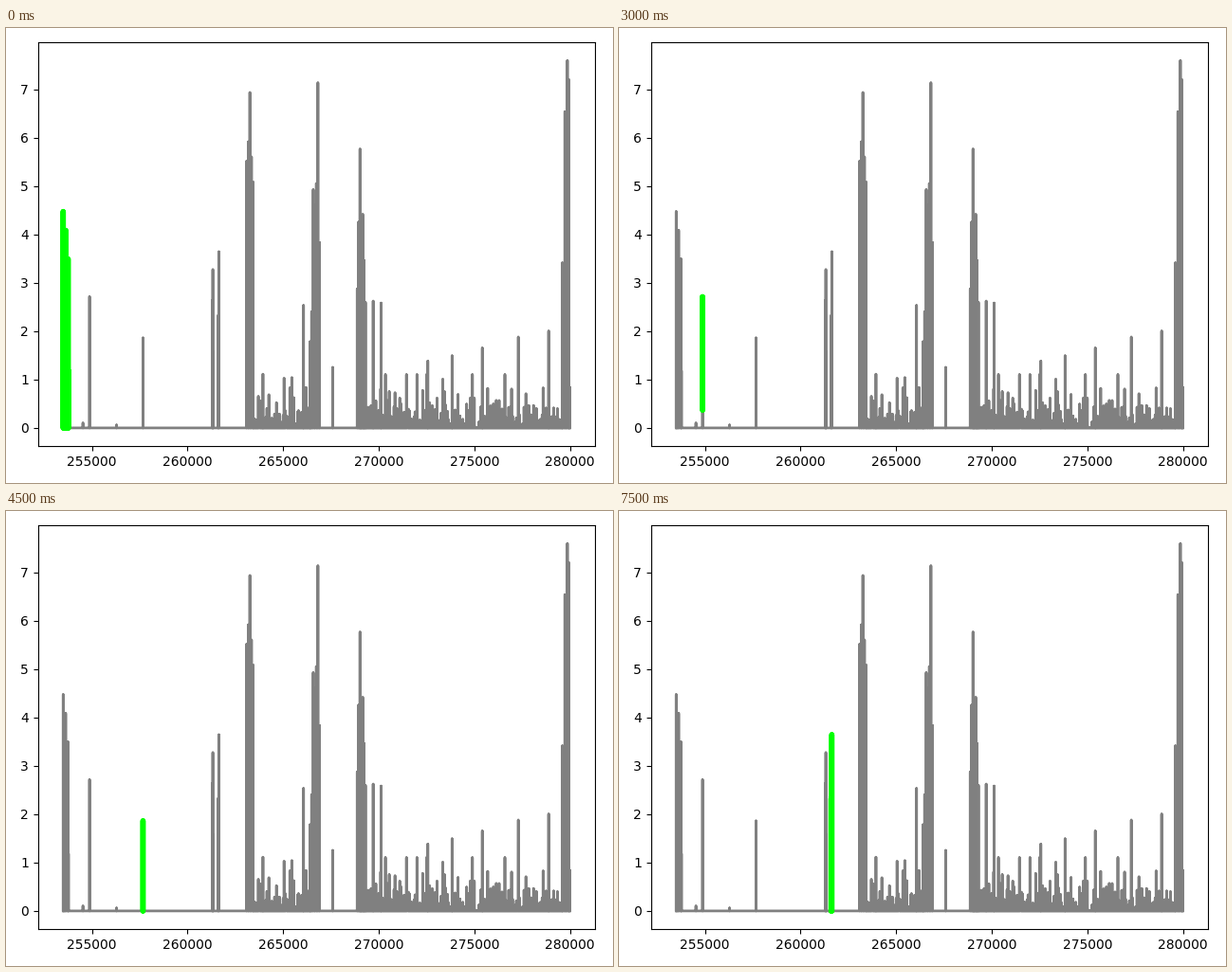
Recreate the animation shown at these times as a matplotlib script. Size 640 by 480 pixels, loop 8 s.

```python
import numpy as np
import matplotlib.pyplot as plt
from matplotlib.animation import FuncAnimation

rng = np.random.default_rng(7)


def burst(start, step, *heights):
    """Evenly spaced spikes, close enough to merge into one block."""
    return [(start + step * i, h) for i, h in enumerate(heights)]


def noise(start, stop, scale_from, scale_to, step=50):
    """Random low spikes whose typical height drifts along the stretch."""
    times = np.arange(start, stop, step)
    scale = np.linspace(scale_from, scale_to, len(times))
    return list(zip(times, np.minimum(rng.exponential(scale), 1.1)))


def signal():
    spikes = [
        # single spikes
        (253765, 1.18), (254522, .1), (254869, 2.71), (256282, .06),
        (257665, 1.86), (263942, 1.11), (265047, 1.03), (266064, 2.53),
        (267586, 1.25), (269708, 2.62), (270119, 2.58), (272568, 1.38),
        (273837, 1.49), (275419, 1.65), (277303, 1.88), (278890, 2.0),
        # tall groups
        *burst(253490, 128, 4.47, 4.08, 3.49),
        *burst(261294, 25, 2.63, 3.27, 1.58),
        *burst(261596, 35, 2.32, 3.64),
        *burst(263089, 84, 5.51, 5.91, 6.93, 5.6, 5.08),
        *burst(266408, 82, 1.78, 2.4, 4.92, 4.6, 5.05, 7.13, 3.83),
        *burst(268874, 72, 2.87, 4.25, 5.76, 4.2, 4.41, 3.46, 2.59),
        *burst(279610, 65, 3.41, 3.0, 6.53, 4.3, 7.59, 7.2, .84),
        # restless stretches
        *noise(263450, 266500, .18, .32),
        *noise(269000, 279650, .27, .29),
    ]
    t, top = np.array(sorted(spikes)).T
    y = np.column_stack([0 * top, top, 0 * top])
    return np.repeat(t, 3), y.ravel()


# Highlighted stretches: first time, last time, lowest value
MARKS = [
    (253480, 253800, 0),
    None,
    (254800, 254900, .37),
    (257600, 257700, 0),
    (261290, 261325, 0),
    (261590, 261640, 0),
]
HOLD = 3    # ticks of 500 ms per highlight

time, value = signal()
fig, ax = plt.subplots(figsize=(6.4, 4.8), dpi=100)
ax.plot(time, value, color="gray", lw=2, snap=False)
mark, = ax.plot([], [], color="lime", lw=4, snap=False,
                solid_capstyle="round")
fig.tight_layout()


def draw(i):
    window = MARKS[i // HOLD]
    if window is None:
        mark.set_data([], [])
    else:
        start, stop, low = window
        inside = (time >= start) & (time <= stop)
        mark.set_data(time[inside], np.maximum(value[inside], low))
    return mark,


anim = FuncAnimation(fig, draw, frames=16, interval=500, repeat=True,
                     repeat_delay=0, blit=False)
plt.show()
```
